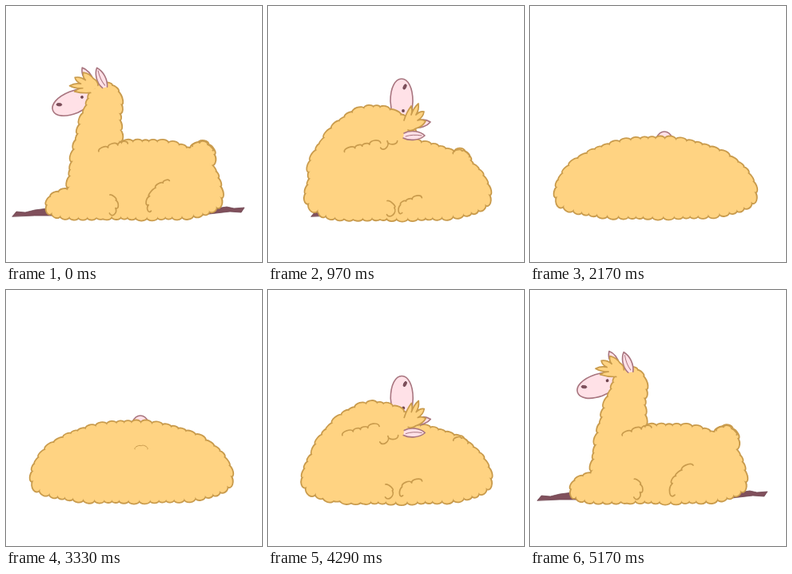
Recreate the animation shown at these times as an HTML page. Size 320 by 320 pixels, loop 5250 ms.

```html
<!DOCTYPE html>
<html lang="en">
<head>
<meta charset="utf-8">
<title>Folding llama</title>
<style>
html, body { margin: 0; width: 100%; height: 100%; overflow: hidden; background: #fff; }
svg { display: block; width: 100%; height: 100%; }
path { stroke-linecap: round; stroke-linejoin: round; }
#rim { fill: none; stroke: #c99b4c; stroke-width: 3.6; }
#coat { fill: #ffd382; }
#tuft { fill: #ffd382; stroke: #c99b4c; stroke-width: 1.7; }
#creases { fill: none; stroke: #c99b4c; stroke-width: 1.7; }
.skin { fill: #ffe1e7; stroke: #a8757f; stroke-width: 1.6; }
.dark { fill: #80505c; stroke: #6d434e; stroke-width: .8; }
</style>
</head>
<body>
<svg viewBox="0 0 320 320">
  <path id="legL" class="dark" d="M8 263L13 257L24 258L36 255L60 252L60 262L36 262Z"/>
  <path id="legR" class="dark" d="M245 253L262 253L276 251L285 253L298 252L294 258L280 257L245 261Z"/>
  <g id="head">
    <path class="skin" d="M0 0C0 -8 11 -14 28 -14L54 -12L54 11L28 14C11 14 0 8 0 0Z"/>
    <ellipse class="dark" cx="10" cy="-4" rx="3.4" ry="1.7" transform="rotate(25 10 -4)"/>
    <circle cx="40" cy="-2" r="1.9" fill="#70454f"/>
  </g>
  <path id="rim"/>
  <path id="coat"/>
  <path id="creases"/>
  <g id="crown">
    <g id="ears">
      <path class="skin" d="M57 -16C49 -23 51 -31 54 -36C59 -32 62 -24 61 -16"/>
      <path class="skin" d="M68 -3C63 -12 66 -24 71 -29C77 -22 78 -10 74 -2"/>
      <path d="M72 -5Q69 -14 71 -25" fill="none" stroke="#a8757f"/>
    </g>
    <path id="tuft" d="M52 -3Q42 -6 34 -12Q40 -14 45 -12Q36 -15 31 -21Q39 -22 45 -18Q40 -23 41 -28Q48 -27 52 -20Q50 -25 53 -30Q60 -26 62 -18Q66 -13 64 -8"/>
  </g>
</svg>
<script>
const LOOP = 5250, STEP = 80, FOLD = 250, OPEN = 3330;
const LEANT = 10, DOWN = 18, GONE = 25, TAU = Math.PI * 2;
const $ = id => document.getElementById(id);

// Blobs: centre, half width, height above, depth below, roundness of the top.
// Neck: base, bend and end of its spine, then the half width at both ends.
// Head: pivot and angle. Feet: how far they slide in and up.
const sitting = {
  body: [175, 238, 95, 70, 28, 2.4], leg: [95, 246, 46, 20, 20, 2],
  haunch: [216, 246, 41, 32, 20, 2], tail: [244, 185, 18, 17, 17, 2],
  neck: [113, 225, 112, 165, 124, 116, 36, 21], head: [105, 112, -22], feet: [0, 0]
};
const leaning = {
  body: [162, 235, 116, 68, 32, 2], leg: [111, 250, 50, 14, 17, 2],
  haunch: [205, 252, 44, 16, 14, 2], tail: [240, 192, 15, 14, 14, 2],
  neck: [95, 205, 118, 131, 168, 156, 45, 17], head: [167, 141, 90], feet: [46, 0]
};
const loaf = {
  body: [157, 232, 126, 68, 33, 2], leg: [111, 245, 40, 10, 14, 2],
  haunch: [205, 245, 40, 12, 14, 2], tail: [238, 204, 10, 10, 10, 2],
  neck: [100, 215, 130, 205, 168, 207, 30, 17], head: [168, 207, 90], feet: [90, -14]
};

const clamp = v => Math.max(0, Math.min(1, v));
const mix = (a, b, p) => a.map((v, i) => v + (b[i] - v) * p);
const sample = (n, fn) => Array.from({ length: n + 1 }, (_, i) => fn(i / n));

function poseAt(n) {
  const p = clamp(n / LEANT), rise = p * p * (3 - 2 * p);
  const [a, b, q] = n < LEANT
    ? [sitting, leaning, rise]
    : [leaning, loaf, clamp((n - LEANT) / (DOWN - LEANT))];
  const pose = {};
  for (const key in a) pose[key] = mix(a[key], b[key], q);
  const lift = 10 * Math.sin(Math.PI * rise);
  pose.head[1] -= lift;
  pose.neck[3] -= lift;
  pose.neck[5] -= lift;
  return pose;
}

// Clockwise arc of a blob; turns run from the right side through the bottom.
function arc([cx, cy, rx, up, down, top], from = 0, to = 1) {
  const bend = (v, p) => Math.sign(v) * Math.abs(v) ** (2 / p);
  return sample(120, u => {
    const a = (from + (to - from) * u) * TAU, s = Math.sin(a);
    const p = s < 0 ? top : 2.8;
    return [cx + (rx - 3) * bend(Math.cos(a), p), cy + ((s < 0 ? up : down) - 3) * bend(s, p)];
  });
}

// Tapered tube: left side, rounded end, then right side.
function tube([ax, ay, bx, by, cx, cy, w0, w1]) {
  const rim = (t, turn) => {
    const k = 1 - t;
    const x = k * k * ax + 2 * k * t * bx + t * t * cx, y = k * k * ay + 2 * k * t * by + t * t * cy;
    const a = Math.atan2(k * (by - ay) + t * (cy - by), k * (bx - ax) + t * (cx - bx)) + turn;
    const w = w0 + (w1 - w0) * t - 3;
    return [x + w * Math.cos(a), y + w * Math.sin(a)];
  };
  const side = Math.PI / 2;
  return {
    outline: [...sample(40, t => rim(t, -side)), ...sample(20, u => rim(1, (2 * u - 1) * side)),
      ...sample(40, u => rim(1 - u, side)), ...sample(20, u => rim(0, side + u * Math.PI))],
    under: sample(30, u => rim(1 - u * .45, side))
  };
}

// Even cusps along a line, joined by tufts that bulge outward and droop at the sides.
function wool(pts) {
  const sum = [0];
  for (let i = 1; i < pts.length; i++)
    sum.push(sum[i - 1] + Math.hypot(pts[i][0] - pts[i - 1][0], pts[i][1] - pts[i - 1][1]));
  const total = sum[sum.length - 1], count = Math.max(2, Math.round(total / 11.5));
  const cusps = sample(count, u => {
    const s = (u + Math.sin(u * TAU * 9) * .2 / count) * total;
    let i = 1;
    while (i < pts.length - 1 && sum[i] < s) i++;
    return mix(pts[i - 1], pts[i], clamp((s - sum[i - 1]) / (sum[i] - sum[i - 1] || 1)));
  });
  const f = (x, y) => `${x.toFixed(1)} ${y.toFixed(1)}`;
  let d = "M" + f(...cusps[0]);
  for (let k = 0; k < count; k++) {
    const [x, y] = cusps[k], [X, Y] = cusps[k + 1];
    const nx = (Y - y) * .45, ny = (x - X) * .45;
    const droop = Math.abs(nx) * (.8 + .3 * Math.sin(k * 4.1));
    d += `C${f(x + nx, y + ny + droop)} ${f(X + nx, Y + ny + droop)} ${f(X, Y)}`;
  }
  return d;
}

function creasesAt(n, pose, neck) {
  const lines = [];
  if (n < DOWN) {
    lines.push(arc(pose.body, .65, .72), arc(pose.leg, -.1, .12), arc(pose.haunch, .42, .7));
    if (n < 14) lines.push(arc(pose.tail, .62, .95));
    if (n > 7) lines.push(neck.under);
  } else if (n < GONE) {
    lines.push(arc([169, 199, 11 + 3 * (GONE - 1 - n), 7, 7, 2], .5, 1));
  }
  return lines.map(wool).join("");
}

function shrink(el, k) {
  el.setAttribute("transform", `translate(62 -8) scale(${k}) translate(-62 8)`);
  el.style.display = k > 0 ? "" : "none";
}

function stepAt(t) {
  if (t < FOLD) return 0;
  if (t < OPEN) return Math.min(GONE, Math.floor((t - FOLD) / STEP) + 1);
  return Math.ceil((LOOP - t) / STEP);
}

let last = -1;
function draw(now) {
  requestAnimationFrame(draw);
  const n = stepAt(now % LOOP);
  if (n === last) return;
  last = n;
  const pose = poseAt(n), neck = tube(pose.neck);
  const [x, y, angle] = pose.head, [slide, rise] = pose.feet;

  const place = `translate(${x} ${y}) rotate(${angle}) translate(-50 0)`;
  $("head").setAttribute("transform", place);
  $("crown").setAttribute("transform", place);
  shrink($("ears"), clamp((DOWN - n) / 6));
  shrink($("tuft"), clamp((22 - n) / 10));

  const blobs = n < DOWN ? [pose.body, pose.leg, pose.tail] : [pose.body];
  const fur = [...blobs.map(b => arc(b)), ...(n < DOWN ? [neck.outline] : [])];
  const coat = fur.map(pts => wool(pts) + "Z").join("");
  $("rim").setAttribute("d", coat);
  $("coat").setAttribute("d", coat);
  $("creases").setAttribute("d", creasesAt(n, pose, neck));
  $("creases").style.strokeWidth = n > 21 ? 1 : 1.7;

  $("legL").setAttribute("transform", `translate(${slide} ${rise})`);
  $("legR").setAttribute("transform", `translate(${-slide} ${rise})`);
}
draw(performance.now());
</script>
</body>
</html>
```
